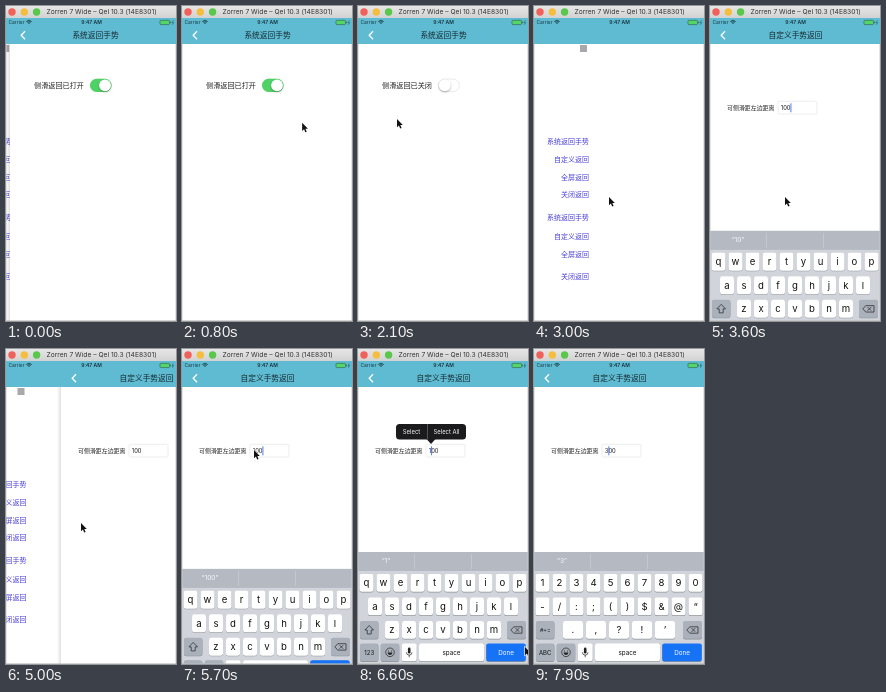
Recreate the animation shown at these times as an HTML page with a canvas. Size 170x315 px, loop 8 s.

```html
<!DOCTYPE html>
<html lang="zh">
<head>
<meta charset="utf-8">
<style>
html, body { margin: 0; width: 100%; height: 100%; overflow: hidden; background: #fff; }
canvas { display: block; width: 170px; height: 315px; }
</style>
</head>
<body>
<canvas id="stage"></canvas>
<script>
const W = 170, H = 315, LOOP = 8000, STEP = 100;
const TEAL = '#5fbbd2', INK = '#222', KEY_GREY = '#abb1bb';
const UI = 'Inter, Roboto, sans-serif';
const CJK = '"Noto Sans CJK SC", "Noto Sans CJK", sans-serif';
const canvas = document.getElementById('stage');
const ctx = canvas.getContext('2d');
const dpr = window.devicePixelRatio || 1;
canvas.width = W * dpr;
canvas.height = H * dpr;

const ease = p => p * p * (3 - 2 * p);

// Interpolates rows of [time, ...values].
function track(t, rows) {
  if (t <= rows[0][0]) return rows[0].slice(1);
  for (let i = 1; i < rows.length; i++) {
    const a = rows[i - 1], b = rows[i];
    if (t < b[0]) {
      const p = ease((t - a[0]) / (b[0] - a[0]));
      return a.slice(1).map((v, k) => v + (b[k + 1] - v) * p);
    }
  }
  return rows[rows.length - 1].slice(1);
}

function rect(x, y, w, h, fill) {
  ctx.fillStyle = fill;
  ctx.fillRect(x, y, w, h);
}

function round(x, y, w, h, r, fill, stroke) {
  ctx.beginPath();
  ctx.roundRect(x, y, w, h, r);
  if (fill) { ctx.fillStyle = fill; ctx.fill(); }
  if (stroke) { ctx.strokeStyle = stroke; ctx.lineWidth = 0.7; ctx.stroke(); }
}

function dot(x, y, r, fill, stroke) {
  ctx.beginPath();
  ctx.arc(x, y, r, 0, 7);
  if (fill) { ctx.fillStyle = fill; ctx.fill(); }
  if (stroke) { ctx.strokeStyle = stroke; ctx.lineWidth = 0.7; ctx.stroke(); }
}

function line(points, color, width = 0.8) {
  ctx.beginPath();
  points.forEach(([x, y], i) => i ? ctx.lineTo(x, y) : ctx.moveTo(x, y));
  ctx.strokeStyle = color;
  ctx.lineWidth = width;
  ctx.stroke();
}

function text(str, x, y, size, { color = INK, align = 'left', font = UI, weight = 400 } = {}) {
  ctx.font = `${weight} ${size}px ${font}`;
  ctx.textAlign = align;
  ctx.textBaseline = 'alphabetic';
  ctx.fillStyle = color;
  ctx.fillText(str, x, y + size * 0.36);
}

function chrome() {
  const g = ctx.createLinearGradient(0, 0, 0, 12);
  g.addColorStop(0, '#e6e6e6');
  g.addColorStop(1, '#d2d2d2');
  rect(0, 0, W, 12, g);
  ['#f2605a', '#f6be3e', '#5ac64b'].forEach((c, i) => dot(6 + i * 12.3, 6, 3.7, c));
  text('Zorren 7 Wide – Qel 10.3 (14E8301)', 95.5, 6, 6.7, { align: 'center', color: '#333' });
}

function statusBar() {
  rect(0, 12, W, 26, TEAL);
  text('Carrier', 2.5, 16.5, 4.9, { color: '#173540' });
  for (let r = 1.3; r < 4.5; r += 1.3) {
    ctx.beginPath();
    ctx.arc(23, 18.3, r, -2.35, -0.79);
    ctx.strokeStyle = '#173540';
    ctx.lineWidth = 0.8;
    ctx.stroke();
  }
  text('9:47 AM', 85.5, 16.5, 5, { align: 'center', weight: 600, color: '#173540' });
  round(154, 14.3, 9.5, 4.3, 0.8, '#55d467', '#356b59');
  rect(164.2, 15.6, 0.8, 1.8, '#356b59');
  line([[167.3, 14.5], [166.2, 16.6], [167.5, 16.6], [166.4, 18.7]], '#173540', 0.5);
}

function navItems(title) {
  line([[15, 25.2], [11.2, 29.2], [15, 33.2]], '#fff', 1.3);
  text(title, 85.5, 29.2, 7.7, { align: 'center', font: CJK, weight: 500, color: '#172a30' });
}

function listPage(x) {
  ctx.save();
  ctx.translate(x, 0);
  rect(46, 39, 7, 7, '#a8a8ac');
  const rows = ['系统返回手势', '自定义返回', '全屏返回', '关闭返回'];
  const ys = [135, 153, 171, 188, 211, 230, 248, 270];
  ys.forEach((y, i) => text(rows[i % 4], 55, y, 7, { align: 'right', font: CJK, color: '#4a3fd8' }));
  ctx.restore();
}

function page(x, title, body) {
  if (x >= W) return;
  if (x > 0) {
    const g = ctx.createLinearGradient(x - 4, 0, x, 0);
    g.addColorStop(0, 'rgba(0,0,0,0)');
    g.addColorStop(1, 'rgba(0,0,0,.12)');
    rect(x - 4, 38, 4, H - 38, g);
  }
  ctx.save();
  ctx.translate(x, 0);
  rect(0, 38, W, H - 38, '#fff');
  navItems(title);
  body();
  ctx.restore();
}

function switchPage(t) {
  const [on] = track(t, [[1200, 1], [1400, 0]]);
  text(on > 0.5 ? '侧滑返回已打开' : '侧滑返回已关闭', 24, 79, 7.15, { font: CJK });
  round(80.3, 73, 21, 12.6, 6.3, '#fff', '#e0e0e0');
  if (on > 0) {
    ctx.globalAlpha = on;
    round(80, 72.7, 21.6, 13.2, 6.6, '#4fd265');
    ctx.globalAlpha = 1;
  }
  ctx.save();
  ctx.shadowColor = 'rgba(0,0,0,.3)';
  ctx.shadowBlur = 2 * dpr;
  ctx.shadowOffsetY = dpr;
  dot(86.8 + 8.2 * on, 79.3, 5.9, '#fff');
  ctx.restore();
}

function fieldPage(t) {
  text('可侧滑距左边距离', 17, 102, 5.95, { font: CJK });
  round(68, 95.3, 39, 12.7, 1.5, '#fff', '#e6e6e6');
  const value = t < 6900 ? '100' : t < 7700 ? '00' : '300';
  text(value, 70.8, 101.8, 5.8);
  const editing = (t >= 3400 && t < 4200) || t >= 5500;
  if (editing) {
    const caret = t < 6000 ? 3 : t >= 6900 && t < 7700 ? 0 : 1;
    ctx.font = `400 5.8px ${UI}`;
    rect(70.8 + ctx.measureText(value.slice(0, caret)).width, 97.3, 0.9, 9, '#3f6df0');
  }
  if (t >= 6200 && t < 6900) menu();
}

function menu() {
  round(38, 75, 70, 15.5, 3.5, '#1b1b1d');
  ctx.beginPath();
  ctx.moveTo(68.5, 90);
  ctx.lineTo(73, 95);
  ctx.lineTo(77.5, 90);
  ctx.fill();
  rect(69, 75, 0.6, 15.5, '#77777a');
  text('Select', 53.5, 82.8, 5.9, { align: 'center', color: '#fff' });
  text('Select All', 88.5, 82.8, 5.9, { align: 'center', color: '#fff' });
}

function key(cx, cy, w, label, { fill = '#fff', size = 9.6, color = '#111' } = {}) {
  round(cx - w / 2, cy - 8.6, w, 18, 2.2, '#8b9097');
  round(cx - w / 2, cy - 9.1, w, 17.9, 2.2, fill);
  if (label) text(label, cx, cy, size, { align: 'center', color });
}

function keyRow(chars, first, gap, y, w) {
  [...chars].forEach((c, i) => key(first + i * gap, y, w, c));
}

function backspace() {
  key(158.5, 281, 19, '', { fill: KEY_GREY });
  line([[152.8, 281], [155.8, 277.8], [164, 277.8], [164, 284.2], [155.8, 284.2], [152.8, 281]], '#222', 0.7);
  line([[157.6, 279.2], [161.2, 282.8]], '#222', 0.7);
  line([[161.2, 279.2], [157.6, 282.8]], '#222', 0.7);
}

function bottomRow(mode) {
  key(11.2, 303.5, 18.5, mode, { fill: KEY_GREY, size: 6 });
  key(32, 303.5, 18.5, '', { fill: KEY_GREY });
  dot(32, 303.3, 4.3, null, '#222');
  dot(30.4, 302, 0.6, '#222');
  dot(33.6, 302, 0.6, '#222');
  ctx.beginPath();
  ctx.arc(32, 303.6, 2.4, 0, Math.PI);
  ctx.fill();
  key(51.2, 303.5, 15, '');
  round(49.9, 298.6, 2.6, 6, 1.3, '#222');
  ctx.beginPath();
  ctx.arc(51.2, 303.3, 2.8, 0, Math.PI);
  ctx.strokeStyle = '#222';
  ctx.lineWidth = 0.7;
  ctx.stroke();
  line([[51.2, 306], [51.2, 308.3]], '#222', 0.7);
  key(93.5, 303.5, 65, 'space', { size: 6.3 });
  key(148, 303.5, 39.5, 'Done', { fill: '#1673f5', size: 6.3, color: '#fff' });
}

function keyboard(t, drop) {
  if (drop >= 112) return;
  ctx.save();
  ctx.translate(0, drop);
  rect(0, 203, W, 112, '#d1d5db');
  rect(0, 203, W, 19, '#b4b9c2');
  rect(56.3, 205, 0.6, 15, '#cdd1d7');
  rect(113, 205, 0.6, 15, '#cdd1d7');
  const hint = t < 3700 ? '10' : t < 6000 ? '100' : t < 6900 ? '1' : t < 7700 ? '' : '3';
  if (hint) text(`“${hint}”`, 28, 212, 6.6, { align: 'center', color: '#f6f7f9' });

  const numeric = t >= 7300;
  keyRow(numeric ? '1234567890' : 'qwertyuiop', 8.5, 17, 234, 14);
  if (numeric) {
    keyRow('-/:;()$&@“', 8.5, 17, 257.5, 14);
    keyRow('.,?!’', 39, 23, 281, 20);
    key(11.2, 281, 18.5, '#+=', { fill: KEY_GREY, size: 5.4 });
  } else {
    keyRow('asdfghjkl', 17, 17, 257.5, 14);
    keyRow('zxcvbnm', 34, 17, 281, 14);
    key(11.2, 281, 18.5, '', { fill: KEY_GREY });
    line([[11.2, 276.5], [6.9, 281], [9.2, 281], [9.2, 285], [13.2, 285],
      [13.2, 281], [15.5, 281], [11.2, 276.5]], '#222', 0.7);
  }
  backspace();
  bottomRow(numeric ? 'ABC' : '123');
  ctx.restore();
}

function keyboardDrop(t) {
  const rise = start => 112 * Math.pow(1 - Math.min(1, Math.max(0, (t - start) / 400)), 3);
  if (t < 4200) return rise(3432);
  if (t < 5500) return track(t, [[4200, 0], [4500, 112]])[0];
  return rise(5513);
}

function pointer(t) {
  if (t < 600 || t >= 7500) return;
  const [x, y] = track(t, [
    [600, 130, 130], [1200, 92, 79], [1500, 92, 79], [2100, 39, 113],
    [2300, 70, 113], [2500, 13, 28], [2600, 13, 28], [3000, 75, 191],
    [4200, 75, 191], [4600, 20, 174], [4700, 20, 174], [5000, 75, 174],
    [5400, 72, 101], [6200, 72, 101], [6600, 167, 298], [6800, 158, 280],
    [7000, 158, 280], [7200, 11, 302]
  ]);
  ctx.beginPath();
  [[0, 0], [0, 8.2], [1.9, 6.5], [3.2, 9.5], [4.6, 8.9], [3.3, 6], [5.8, 5.9]]
    .forEach(([dx, dy]) => ctx.lineTo(x + dx, y + dy));
  ctx.closePath();
  ctx.strokeStyle = '#fff';
  ctx.lineWidth = 1.2;
  ctx.stroke();
  ctx.fillStyle = '#111';
  ctx.fill();
}

function draw(t) {
  ctx.setTransform(dpr, 0, 0, dpr, 0, 0);
  rect(0, 0, W, H, '#fff');
  statusBar();
  const [first] = track(t, [[0, 4], [300, 0], [2500, 0], [2800, 170]]);
  const [second] = track(t, [[3100, 170], [3400, 0], [4700, 0], [5000, 55], [5200, 0]]);
  const front = Math.min(first, second);
  if (front > 0) listPage(-0.3 * (W - front));
  page(first, '系统返回手势', () => switchPage(t));
  page(second, '自定义手势返回', () => fieldPage(t));
  keyboard(t, keyboardDrop(t));
  chrome();
  rect(0, 38, 0.5, H - 38, '#c8c8c8');
  rect(W - 0.5, 38, 0.5, H - 38, '#c8c8c8');
  rect(0, H - 0.6, W, 0.6, '#bbb');
  pointer(t);
}

const start = performance.now();
function tick(now) {
  const t = Math.max(0, now - start) % LOOP;
  draw(Math.floor(t / STEP) * STEP);
  requestAnimationFrame(tick);
}
tick(start);
</script>
</body>
</html>
```
